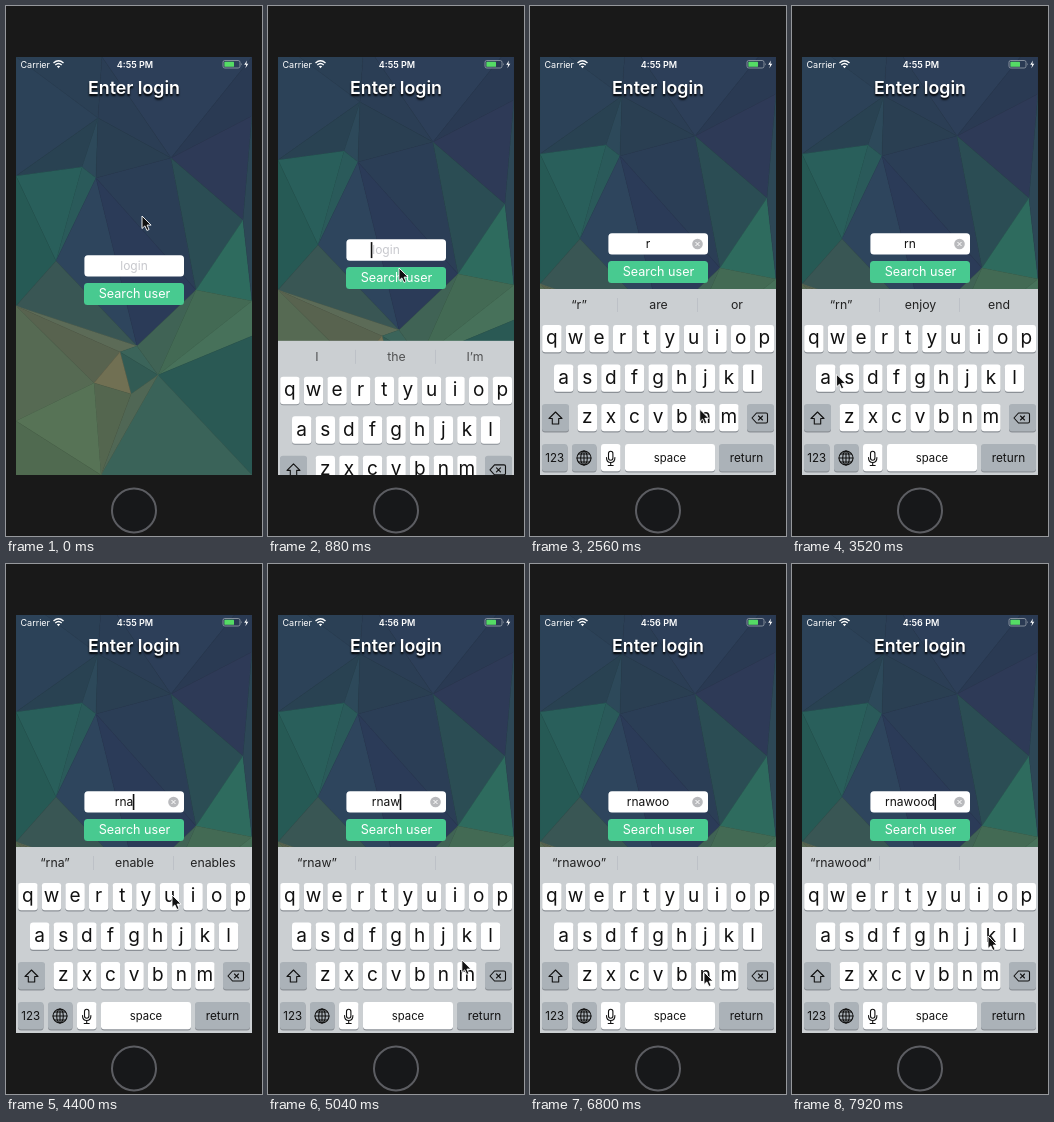
An HTML page for the animation above (8000 ms loop, 256 by 530 pixels).

```html
<!DOCTYPE html>
<html lang="en">
<head>
<meta charset="utf-8">
<style>
html, body { margin: 0; width: 100%; height: 100%; overflow: hidden; background: #191919; }
svg { display: block; width: 256px; height: 530px; font-family: Inter, Roboto, sans-serif; }
.mid { text-anchor: middle; }
.line { fill: none; stroke: #111; stroke-width: 1.1; stroke-linejoin: round; stroke-linecap: round; }
#title { font-weight: 600; font-size: 17.8px; fill: #fff; text-shadow: 0 1.5px 2px #000; }
</style>
</head>
<body>
<svg viewBox="0 0 256 530">
  <defs><clipPath id="screen"><rect x="10" y="51" width="236" height="418"/></clipPath></defs>
  <circle cx="128" cy="504.500" r="22" fill="#17181a" stroke="#5c5d62" stroke-width="2"/>
  <g clip-path="url(#screen)">
    <g id="form">
      <g id="mesh"></g>
      <rect x="78.400" y="249.200" width="99.600" height="21.400" rx="3.500" fill="#fff"/>
      <rect id="select" y="252.500" height="15" fill="#c3c9d1"/>
      <text id="entry" class="mid" y="263.500" font-size="12"></text>
      <rect id="caret" y="252" width="1.600" height="16" fill="#111"/>
      <g id="clear">
        <circle cx="167.500" cy="260" r="5.300" fill="#b9babd"/>
        <path d="M165.500 258l4 4m0-4l-4 4" stroke="#fff"/>
      </g>
      <rect x="78" y="277" width="100" height="22" rx="3.500" fill="#48ca90"/>
      <text class="mid" x="128.500" y="292.300" font-size="12.600" fill="#fff">Search user</text>
    </g>
    <g fill="#fff" font-size="9">
      <text x="14.500" y="61.500">Carrier</text>
      <text id="clock" class="mid" x="129" y="61.500" font-weight="600"></text>
      <path d="M47.500 57q5-4.500 10 0M49.300 59q3.200-2.800 6.400 0" fill="none" stroke="#fff" stroke-width="1.400"/>
      <path d="M50.800 60.300q1.700-1.200 3.400 0l-1.700 1.900z"/>
      <rect x="217" y="54.500" width="17" height="7.500" rx="1.800" fill="none" stroke="#9aa3ad" stroke-width=".8"/>
      <rect x="218.400" y="55.800" width="9.600" height="5" rx=".6" fill="#55dc65"/>
      <path d="M235 57q1.400 1.200 0 2.500z" fill="#9aa3ad"/>
      <path d="M241 54.500l-2.800 4.200h2l-.8 3.500 2.900-4.400h-2z"/>
    </g>
    <text id="title" class="mid" x="128" y="88.200">Enter login</text>
    <g id="keyboard">
      <rect x="10" y="283" width="236" height="187" fill="#cbcfd2"/>
      <path d="M87.500 292v14M167.500 292v14" stroke="#b9bec4" stroke-width=".8"/>
      <rect id="pill" x="90" y="288" width="76" height="22" rx="4" fill="#e9ebed"/>
      <g id="hints" font-size="12.300" fill="#222"></g>
      <g id="keys"></g>
      <path class="line" d="M25.500 406l-6.500 6.500h3.300v5.500h6.400v-5.500h3.300z"/>
      <path class="line" d="M226.500 407h9.500q1.500 0 1.500 1.500v7q0 1.500-1.500 1.500h-9.500l-4.500-5zM228.500 410l4 4m0-4l-4 4"/>
      <g class="line">
        <circle cx="54" cy="452" r="7"/>
        <ellipse cx="54" cy="452" rx="3.300" ry="7"/>
        <path d="M47 452h14M54 445v14M48.500 448h11M48.500 456h11"/>
      </g>
      <path class="line" d="M78.500 447.500a2.200 2.200 0 0 1 4.400 0v4.500a2.200 2.200 0 0 1-4.400 0zM76.500 451.500q0 5 4.200 5t4.200-5M80.700 456.500v3m-2.500 0h5"/>
    </g>
  </g>
  <path id="pointer" d="M0 0v12.500l2.900-2.600 2 4.600 2.200-1-2-4.400h4z" fill="#111" stroke="#fff" stroke-width=".9"/>
</svg>
<script>
const LOOP = 8000, STEP = 80;
const $ = id => document.getElementById(id);
const move = (el, x, y) => el.setAttribute('transform', `translate(${x} ${y})`);
const show = (el, on) => el.style.display = on ? '' : 'none';

// Low-poly backdrop: shared corners, triangles between them, colour by place
const corners = {
  a: [10, 51], b: [96, 51], c: [246, 51], d: [92, 112], e: [76, 161], f: [10, 170],
  g: [90, 172], h: [165, 152], i: [246, 110], j: [237, 214], k: [50, 255], l: [190, 284],
  m: [246, 295], n: [131, 340], o: [114, 346], p: [88, 377], q: [125, 388], r: [152, 369],
  s: [10, 300], t: [10, 415], u: [10, 469], v: [246, 469], w: [95, 469], y: [246, 330]
};
const triangles = 'abd adf def bch bhd cih deg dhg egk fek fks gkn ghl gln hij hjl jml ijm ' +
  'kns sno sop spt onr orq opq lnr lmr myr yvr rvw qrw pqw ptw tuw';
const tones = [
  [40, 90, '2b4055'], [170, 85, '2b3d56'], [220, 165, '2c3854'], [130, 250, '2b3b59'],
  [35, 230, '285e59'], [225, 262, '2d685b'], [108, 370, '6c6b50'], [130, 368, '356058'],
  [65, 430, '536e52'], [200, 315, '446c56'], [210, 400, '2c5d58']
];
const rgb = hex => [0, 2, 4].map(i => parseInt(hex.substr(i, 2), 16));

function toneAt(x, y, shade) {
  let total = 0, sum = [0, 0, 0];
  for (const [tx, ty, hex] of tones) {
    const weight = 1 / (((x - tx) ** 2 + (y - ty) ** 2) ** 2 + 1);
    total += weight;
    sum = sum.map((s, i) => s + weight * rgb(hex)[i]);
  }
  return `rgb(${sum.map(s => Math.round(s / total * shade))})`;
}

$('mesh').innerHTML = triangles.split(' ').map((name, i) => {
  const pts = [...name].map(c => corners[c]);
  const [x, y] = [0, 1].map(k => pts.reduce((s, p) => s + p[k] / 3, 0));
  const fill = toneAt(x, y, 1 + 0.05 * Math.sin(i * 2.4));
  return `<polygon points="${pts.join(' ')}" fill="${fill}" stroke="${fill}" stroke-width=".4"/>`;
}).join('');

const GREY = '#abb2b8';
const key = (x, y, w, label, size = 19, fill = '#fff') => `
  <rect x="${x}" y="${y + 1}" width="${w}" height="27.500" rx="3" fill="#8b9096"/>
  <rect x="${x}" y="${y}" width="${w}" height="27.300" rx="3" fill="${fill}"/>
  <text class="mid" x="${x + w / 2}" y="${y + (size > 15 ? 19.3 : 17.8)}" font-size="${size}" fill="#111">${label}</text>`;
const row = (letters, x, y) => [...letters].map((c, i) => key(x + i * 23.6, y, 19.4, c)).join('');
$('keys').innerHTML =
  row('qwertyuiop', 12.2, 319) + row('asdfghjkl', 24, 358.5) + row('zxcvbnm', 47.6, 398) +
  key(12, 398, 27, '', 12, GREY) + key(217, 398, 27, '', 12, GREY) +
  key(12, 438, 25.5, '123', 11.5, GREY) + key(42, 438, 24.5, '', 12, GREY) + key(71, 438, 19.5, '') +
  key(95, 438, 90, 'space', 11.3) + key(189, 438, 55, 'return', 11.8, GREY);
$('hints').innerHTML = [49, 128.5, 207].map(x => `<text class="mid" x="${x}" y="303"></text>`).join('');
const hints = [...$('hints').children];

const LOGIN = 'rnawood', FIX = 'Prawn';
const guesses = [['the', 'I’m'], ['are', 'or'], ['enjoy', 'end'], ['enable', 'enables'], [], [FIX, 'resume']];

// Pointer stops: arrival time, x, y. It clicks after PRESS and leaves after REST.
const PRESS = 320, REST = 400;
const stops = [
  [-REST, 136, 210], [473, 131, 262], [1680, 97, 322], [2640, 174, 408], [3600, 37, 366],
  [4400, 166, 331], [5120, 199, 408], [5760, 70, 336], [6560, 174, 408], [7920, 196, 372]
];
const clicks = stops.slice(1).map(s => s[0] + PRESS);
const FOCUS = clicks[0];

function pointerAt(t) {
  const i = stops.filter(s => s[0] <= t).length - 1;
  const [t0, x0, y0] = stops[i], [t1, x1, y1] = stops[i + 1] || [LOOP * 2, x0, y0];
  const u = Math.max(0, (t - t0 - REST) / (t1 - t0 - REST)), e = u * u * (3 - 2 * u);
  return [x0 + (x1 - x0) * e, y0 + (y1 - y0) * e];
}

function draw(t) {
  const u = Math.min(1, Math.max(0, (t - FOCUS) / 250));
  const rise = 1 - (1 - u) ** 3;
  move($('form'), 0, -22 * rise);
  move($('keyboard'), 0, 187 * (1 - rise));
  show($('keyboard'), rise > 0);
  move($('pointer'), ...pointerAt(t));
  $('clock').textContent = t < 5040 ? '4:55 PM' : '4:56 PM';

  const done = clicks.filter(c => c <= t).length;
  const typed = Math.max(0, done - 1), text = LOGIN.slice(0, typed);
  const entry = $('entry'), centre = done ? 118 : 128;
  entry.textContent = text || 'login';
  entry.setAttribute('x', centre);
  entry.setAttribute('fill', text ? '#111' : '#c7c8cd');
  const half = entry.getComputedTextLength() / 2;
  $('caret').setAttribute('x', centre + (text ? half - 0.5 : -half - 1.5));
  show($('caret'), done && (t - clicks[done - 1]) % 1000 < 500);
  show($('clear'), text);

  const [middle = '', right = ''] = guesses[typed] || [];
  show($('select'), middle === FIX);
  show($('pill'), middle === FIX);
  $('select').setAttribute('x', centre - half - 0.5);
  $('select').setAttribute('width', half * 2 + 1);
  [text ? `“${text}”` : 'I', middle, right].forEach((s, i) => hints[i].textContent = s);
  $('hints').setAttribute('opacity', rise);
}

const start = performance.now();
function tick() {
  const t = (performance.now() - start) % LOOP;
  draw(Math.floor(t / STEP) * STEP);
  requestAnimationFrame(tick);
}
tick();
</script>
</body>
</html>
```
